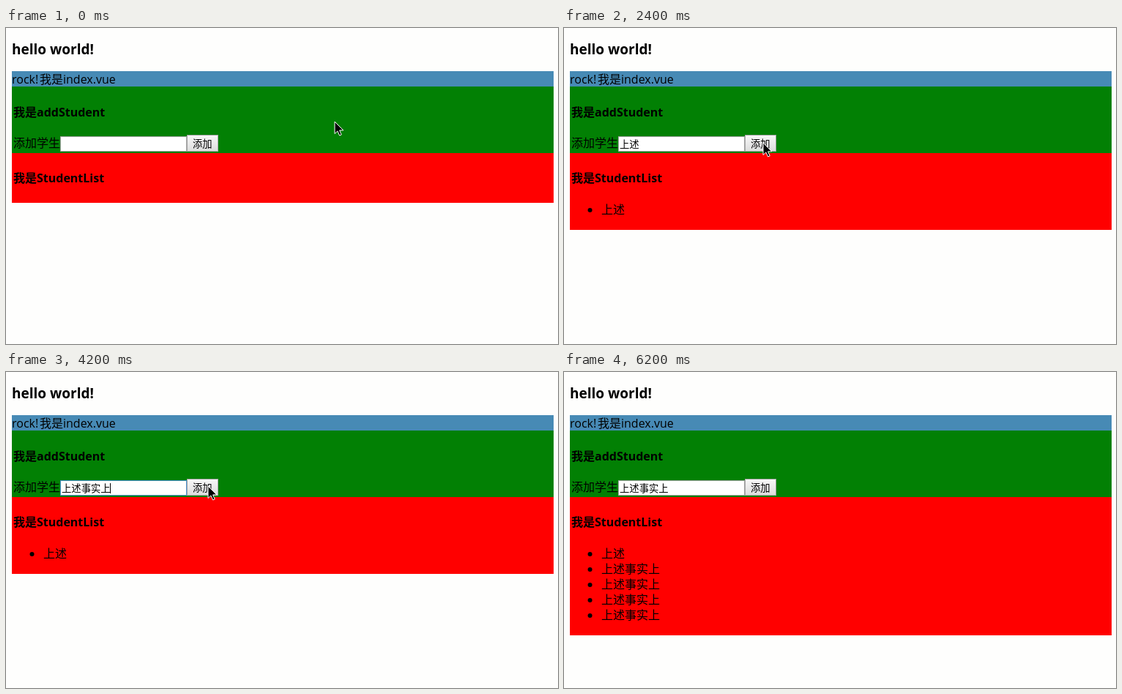
Recreate the animation shown at these times as an HTML page. Size 754 px wide and 432 px high, loop 6800 ms.

```html
<!DOCTYPE html>
<html lang="zh-CN">
<head>
<meta charset="utf-8">
<title>Student list</title>
<style>
  html, body { margin: 0; width: 100%; height: 100%; overflow: hidden; background: #fefefd; }
  svg { display: block; width: 754px; height: 432px; }
  text { font: 16px "Open Sans", "Noto Sans CJK SC", "Noto Sans CJK", sans-serif; white-space: pre; }
  .bold { font-weight: 700; }
  .title { font-size: 19px; }
  .field { font: 13.33px "Liberation Sans", "Noto Sans CJK SC", "Noto Sans CJK", sans-serif; }
  .num { font-size: 13px; fill: #808080; }
  .word { font-size: 17px; }
  .chosen { fill: #fff; }
  .line { fill: none; stroke: #000; }
</style>
</head>
<body>
<svg viewBox="0 0 754 432">
  <defs>
    <linearGradient id="face" x2="0" y2="1">
      <stop stop-color="#f8f8f8"/>
      <stop offset="1" stop-color="#dddddd"/>
    </linearGradient>
  </defs>

  <text class="bold title" x="8" y="36">hello world!</text>
  <rect x="8" y="59" width="740" height="21" fill="#478ab5"/>
  <text y="76"><tspan x="8">rock!</tspan><tspan x="46">我是</tspan><tspan x="78">index.vue</tspan></text>

  <rect x="8" y="80" width="740" height="91" fill="#028004"/>
  <text class="bold" x="10" y="121">我是addStudent</text>
  <text x="10" y="163">添加学生</text>
  <rect id="box" x="74.5" y="148.5" width="172" height="20" fill="#fff"/>
  <rect x="247.5" y="146.5" width="42" height="22" fill="url(#face)" stroke="#a6a6a6"/>
  <text class="field" x="255" y="163">添加</text>

  <rect id="panel" x="8" y="171" width="740" height="68" fill="#f00"/>
  <text class="bold" x="10" y="211">我是StudentList</text>
  <g id="list"></g>

  <text id="value" class="field" x="76" y="163.5"></text>
  <path id="marks" class="line"/>
  <path id="caret" class="line"/>
  <g id="ime"></g>

  <path id="arrow" d="M0 0V16.5L3.9 12.9L6.6 19L9.2 17.9L6.6 11.9H11.8Z" stroke="#fff"/>
  <path id="beam" class="line" d="M-3.5-8.5H-1L0-7.5L1-8.5H3.5M0-7.5V7M-3.5 8H-1L0 7L1 8H3.5"/>
</svg>
<script>
const LOOP = 6800, STEP = 200;
const $ = id => document.getElementById(id);

const one = [..."是说上时三四十"];
const two = ["上述", "实施", "事实", "设施", "时尚", "手术", "是"];
const three = ["事实上", "死锁属", "生宿舍", "三数四", "是是是", "杀杀杀", "三十三"];

// time, committed text, letters being composed, candidates, focused, caret shown
const typing = [
  [0, "", "", null, 0, 0],
  [600, "", "", null, 1, 1],
  [1000, "", "s", one, 1, 1],
  [1200, "", "s's", two, 1, 1],
  [1800, "", "s's", null, 1, 0],
  [2000, "上述", "", null, 1, 1],
  [2200, "上述", "", null, 0, 0],
  [3000, "上述", "", null, 1, 1],
  [3400, "上述", "s", one, 1, 1],
  [3600, "上述", "s's", two, 1, 1],
  [3800, "上述", "s's's", three, 1, 1],
  [4200, "上述事实上", "", null, 1, 1],
  [4400, "上述事实上", "", null, 0, 0]
];

// time, x, y of the pointer
const path = [
  [0, 449, 128], [200, 400, 138], [400, 230, 156], [600, 190, 158], [800, 215, 157],
  [1000, 253, 155], [1800, 270, 156], [2400, 272, 157], [2800, 205, 156],
  [3200, 185, 155], [3400, 205, 155], [3800, 274, 154], [4600, 278, 157],
  [5600, 278, 157], [5800, 290, 240], [6000, 305, 377], [6200, 320, 450]
];

const added = [2200, 4400, 5000, 5400, 5600];

const label = (cls, x, y, s) => `<text class="${cls}" x="${x}" y="${y}">${s}</text>`;
const show = (el, on) => el.style.display = on ? "" : "none";

function pointer(t) {
  const i = path.findIndex(p => p[0] > t);
  if (i < 0) return path[path.length - 1].slice(1);
  const [t0, x0, y0] = path[i - 1], [t1, x1, y1] = path[i];
  const k = (t - t0) / (t1 - t0);
  return [Math.round(x0 + (x1 - x0) * k), Math.round(y0 + (y1 - y0) * k)];
}

function candidates(words, left, top) {
  let x = left + 1, items = "";
  words.forEach((w, i) => {
    const width = 43 + 17 * w.length, cls = i ? "" : " chosen";
    if (!i) items += `<rect x="${left}" y="${top}" width="${width + 1}" height="44" fill="#0078d7"/>`;
    items += label("num" + cls, x + 16, top + 29, i + 1) + label("word" + cls, x + 27, top + 29, w);
    x += width;
  });
  const cx = x + 22, cy = top + 22;
  return `<rect x="${left + .5}" y="${top + .5}" width="${x + 44 - left}" height="43" fill="#fff" stroke="#1a6fb8"/>
    ${items}
    <path d="M${x + .5} ${top}v44" stroke="#1a6fb8"/>
    <circle class="line" cx="${cx}" cy="${cy}" r="8" stroke-width="1.2"/>
    <path class="line" stroke-width="1.2" d="M${cx - 4.5} ${cy + 2}q4.5 5.5 9 0"/>
    <circle cx="${cx - 3}" cy="${cy - 2.5}" r="1.2"/><circle cx="${cx + 3}" cy="${cy - 2.5}" r="1.2"/>`;
}

function drawField(t) {
  const [, text, keys, words, focus, caret] = typing.filter(r => r[0] <= t).pop();
  const start = 76 + text.length * 13.33;
  let x = start, marks = "";
  for (const c of keys) {
    const w = c === "s" ? 6.67 : 2.55;
    if (c === "s") marks += `M${x.toFixed(1)} 165.5h6.4`;
    x += w;
  }
  $("value").textContent = text + keys;
  $("marks").setAttribute("d", marks);
  $("caret").setAttribute("d", `M${Math.floor(x) + .5} 152v14`);
  show($("caret"), caret);
  $("box").setAttribute("stroke", focus ? "#4a90d0" : "#a3a3a3");
  $("ime").innerHTML = words ? candidates(words, text ? 100 : 73, text ? 170 : 169) : "";
}

function drawList(t) {
  const n = added.filter(a => a <= t).length;
  $("panel").setAttribute("height", n ? 84 + 21 * n : 68);
  $("list").innerHTML = added.slice(0, n).map((_, i) => {
    const y = 254 + 21 * i;
    return `<circle cx="35.5" cy="${y - 5}" r="3"/>` + label("", 51, y, i ? "上述事实上" : "上述");
  }).join("");
}

function drawPointer(t) {
  const [x, y] = pointer(t);
  const inside = x > 74 && x < 247 && y > 148 && y < 169;
  show($("beam"), inside);
  show($("arrow"), !inside);
  $("beam").setAttribute("transform", `translate(${x + .5} ${y})`);
  $("arrow").setAttribute("transform", `translate(${x} ${y})`);
}

let last = -1;
function tick() {
  const t = Math.floor(performance.now() % LOOP / STEP) * STEP;
  if (t !== last) {
    last = t;
    drawField(t);
    drawList(t);
    drawPointer(t);
  }
  requestAnimationFrame(tick);
}
tick();
</script>
</body>
</html>
```
